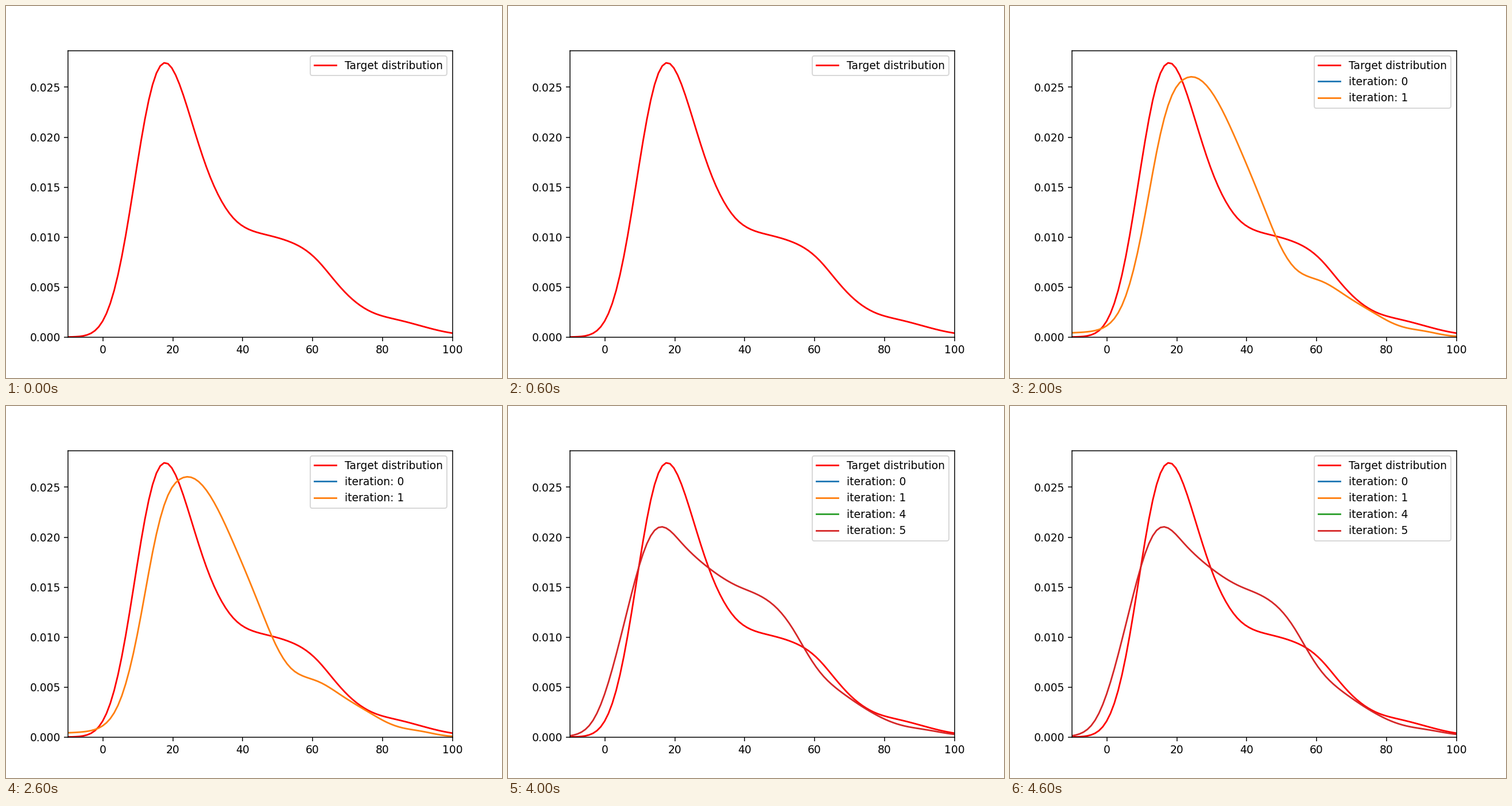
A matplotlib script that plays this animation: 864x648 px, repeating every 5000 ms.

```python
import numpy as np
import matplotlib.pyplot as plt
from matplotlib.animation import FuncAnimation

START, GAP = -10, 8  # first key position and the spacing of the keys

# Key densities in units of 1e-4
GOAL = [0.1, 7.3, 91.7, 250, 252, 166.4, 116.6, 103,
        94.6, 74.5, 42.3, 23.4, 15.9, 8.4, 3]
FIRST = [4.3, 7.9, 47.5, 181.3, 258, 245, 188.8, 120.7,
         68.2, 55, 37.7, 20.9, 9, 3.9, 0.4]
FOURTH = [1.3, 20.8, 118.2, 213.8, 199.7, 170.4, 152, 133.7,
          97.8, 55.8, 36, 23.7, 11.7, 7.3, 3.5]
FIFTH = [1.3, 26, 121, 206, 194, 168.4, 151, 138,
         107, 63, 39, 21.5, 10.9, 6.1, 2]

CURVES = [
    ("Target distribution", "red", GOAL),
    ("iteration: 0", "C0", FIRST),
    ("iteration: 1", "C1", FIRST),
    ("iteration: 4", "C2", FOURTH),
    ("iteration: 5", "C3", FIFTH),
]


def density(x, keys):
    """Natural cubic spline through the logarithms of the keys."""
    y = np.log(np.array(keys) * 1e-4)
    n = len(y)
    system = 4 * np.eye(n) + np.eye(n, k=1) + np.eye(n, k=-1)
    system[[0, -1]] = np.eye(n)[[0, -1]]
    bend = np.linalg.solve(system, np.pad(np.diff(y, 2), 1))
    pos = (x - START) / GAP
    i = np.clip(pos.astype(int), 0, n - 2)
    b = pos - i
    a = 1 - b
    return np.exp(a * y[i] + b * y[i + 1]
                  + (a**3 - a) * bend[i] + (b**3 - b) * bend[i + 1])


fig, ax = plt.subplots(figsize=(6.4, 4.8), dpi=135)
ax.set_xlim(-10, 100)
ax.set_ylim(0, 0.02866)

x = np.linspace(-10, 100, 101)
lines = [ax.plot([], [], color=color, label=label)[0]
         for label, color, _ in CURVES]


def draw(step):
    for k, (line, (_, _, keys)) in enumerate(zip(lines, CURVES)):
        shown = k in (0, step)
        line.set_data(*((x, density(x, keys)) if shown else ([], [])))
    ax.legend(handles=lines[:step + 1], loc="upper right")
    return lines


anim = FuncAnimation(fig, draw, frames=len(CURVES), interval=1000,
                     repeat=True, repeat_delay=0)
plt.show()
```
